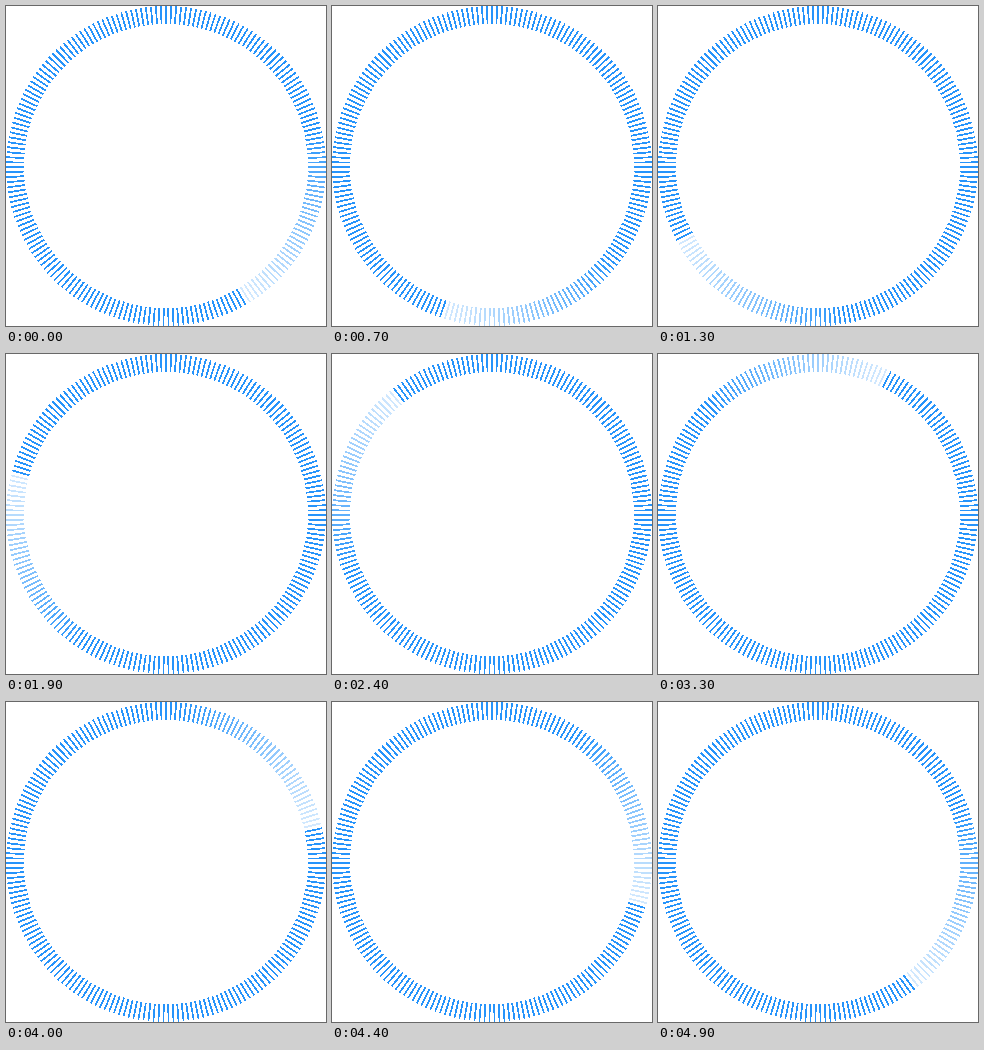
An HTML page that plays this animation: 320 by 320 pixels, repeating every 5 s.

```html
<!DOCTYPE html>
<html lang="en">
<head>
<meta charset="utf-8">
<title>Tick ring loader</title>
<style>
  html, body {
    margin: 0;
    width: 100%;
    height: 100%;
    overflow: hidden;
    background: #fff;
  }
  svg {
    display: block;
    stroke: #2694fb;
    stroke-width: 1.75;
    shape-rendering: crispEdges;
  }
</style>
</head>
<body>
<svg width="320" height="320" viewBox="-160 -160 320 320"></svg>
<script>
  const TICKS = 199;
  const LOOP = 5000;    // ms
  const STEP = 100;     // ms between redraws
  const START = 148.58; // leading edge at time 0, degrees clockwise from the top
  const TAIL = 72;      // degrees over which a tick recovers
  const FAINT = 0.2;

  const svg = document.querySelector('svg');
  const angleOf = i => i * 360 / TICKS;

  const ticks = Array.from({ length: TICKS }, (_, i) => {
    const tick = document.createElementNS(svg.namespaceURI, 'line');
    tick.setAttribute('y1', -160);
    tick.setAttribute('y2', -142);
    tick.setAttribute('transform', `rotate(${angleOf(i)})`);
    svg.append(tick);
    return tick;
  });

  function draw(time) {
    const step = Math.floor(time % LOOP / STEP);
    const head = START + step * STEP / LOOP * 360;
    ticks.forEach((tick, i) => {
      const behind = (head - angleOf(i) + 360) % 360;
      const recovered = Math.min(1, behind / TAIL) ** 1.2;
      tick.setAttribute('opacity', FAINT + (1 - FAINT) * recovered);
    });
  }

  function loop() {
    draw(performance.now());
    requestAnimationFrame(loop);
  }
  loop();
</script>
</body>
</html>
```
